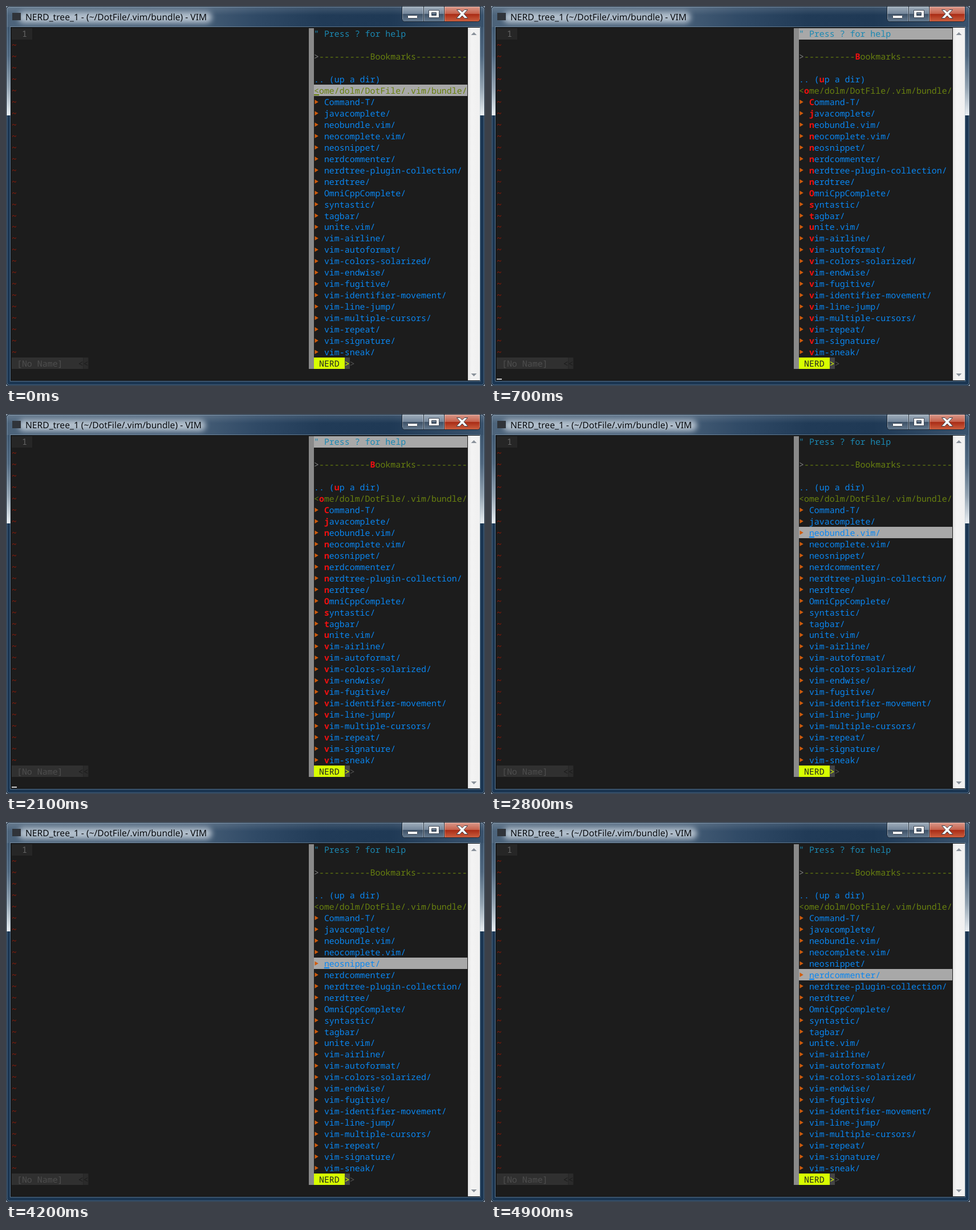
An HTML page that plays this animation: 840 by 667 pixels, repeating every 5.6 s.

```html
<!DOCTYPE html>
<html lang="en">
<head>
<meta charset="utf-8">
<title>File tree jump</title>
<style>
  html, body { margin: 0; width: 100%; height: 100%; overflow: hidden; background: #8d99a5; }
  svg { display: block; }
  text { white-space: pre; text-rendering: geometricPrecision; }
  .mono { font: 14.93px "Noto Sans Mono", "DejaVu Sans Mono", monospace; }
  .title { font: 15.62px "Noto Sans", "Open Sans", sans-serif; fill: #06090d; }
  .dir { fill: #0a86f0; }
  .help { fill: #1b88b2; }
  .olive { fill: #68800f; }
  .grey { fill: #808080; }
  .tilde { fill: #941a08; }
  .hint { fill: #f01010; font-weight: 700; }
</style>
</head>
<body>
<svg id="stage" width="840" height="667" viewBox="0 0 840 667">
  <defs>
    <linearGradient id="bar">
      <stop offset="0" stop-color="#4d647b"/><stop offset=".4" stop-color="#455d76"/>
      <stop offset=".52" stop-color="#304a66"/><stop offset=".66" stop-color="#213b57"/>
      <stop offset=".8" stop-color="#1f3955"/><stop offset="1" stop-color="#3a536d"/>
    </linearGradient>
    <linearGradient id="gloss" x2="0" y2="1">
      <stop offset="0" stop-color="#fff" stop-opacity=".16"/>
      <stop offset="1" stop-color="#fff" stop-opacity="0"/>
    </linearGradient>
    <linearGradient id="side" x2="0" y2="1">
      <stop offset="0" stop-color="#3c556e"/><stop offset=".35" stop-color="#506880"/>
      <stop offset=".7" stop-color="#94a4b2"/><stop offset="1" stop-color="#eaeff3"/>
    </linearGradient>
    <linearGradient id="glass" x2="0" y2="1">
      <stop offset="0" stop-color="#a3b1be"/><stop offset=".48" stop-color="#74869a"/>
      <stop offset=".5" stop-color="#3c5066"/><stop offset="1" stop-color="#667b90"/>
    </linearGradient>
    <linearGradient id="close" x2="0" y2="1">
      <stop offset="0" stop-color="#dc9c8e"/><stop offset=".48" stop-color="#c5624d"/>
      <stop offset=".5" stop-color="#a82a14"/><stop offset="1" stop-color="#cc6040"/>
    </linearGradient>
    <linearGradient id="track">
      <stop offset="0" stop-color="#e6e6e6"/><stop offset=".3" stop-color="#f3f3f3"/>
      <stop offset="1" stop-color="#f0f0f0"/>
    </linearGradient>
    <filter id="blur" x="-10%" y="-60%" width="120%" height="220%"><feGaussianBlur stdDeviation="5"/></filter>
    <clipPath id="frame"><rect width="840" height="667" rx="6"/></clipPath>
  </defs>

  <g clip-path="url(#frame)">
    <rect width="840" height="667" fill="#1c3753"/>
    <rect y="30" width="9" height="162" fill="url(#side)"/>
    <rect x="831" y="30" width="9" height="162" fill="url(#side)"/>
    <rect width="840" height="37" fill="url(#bar)"/>
    <rect width="840" height="16" fill="url(#gloss)"/>
    <rect id="glow" x="22" y="10" height="20" rx="9" fill="#d3dde6" opacity=".76" filter="url(#blur)"/>
  </g>
  <rect x=".5" y=".5" width="839" height="666" rx="6" fill="none" stroke="#0b1420"/>
  <rect x="1.5" y="1.5" width="837" height="664" rx="5" fill="none" stroke="#bdd0e0" stroke-opacity=".5"/>
  <rect x="7.5" y="36.5" width="824" height="622" fill="none" stroke="#a9bccb" stroke-opacity=".45"/>
  <rect x="8.5" y="37.5" width="822" height="620" fill="#1c1c1c" stroke="#0c1117"/>
  <rect x="11" y="12" width="15" height="13" fill="#30343a"/>
  <text id="title" class="title" x="34" y="25"></text>

  <g stroke="#1a2735">
    <path d="M694.5 .5H732.5V27.5H699.5Q694.5 27.5 694.5 22.5Z" fill="url(#glass)"/>
    <path d="M732.5 .5H768.5V27.5H732.5Z" fill="url(#glass)"/>
    <path d="M768.5 .5H831.5V22.5Q831.5 27.5 826.5 27.5H768.5Z" fill="url(#close)"/>
    <path d="M695.5 23V1.5H731.5V26.5M733.5 26.5V1.5H767.5V26.5M769.5 26.5V1.5H830.5V23" fill="none" stroke="#fff" stroke-opacity=".35"/>
  </g>
  <g stroke="#3b4350" fill="#fff">
    <rect x="704.5" y="16.5" width="17" height="5" rx="1"/>
    <path fill-rule="evenodd" d="M741.5 7.5H759.5V20.5H741.5ZM746.5 11.5V16.5H754.5V11.5Z"/>
    <path d="M790.5 6.5H796L800 10.5L804 6.5H809.5L803 13.7L810 21.5H804.2L800 17L795.8 21.5H790L797 13.7Z"/>
  </g>

  <rect x="810" y="38" width="21" height="619" fill="url(#track)"/>
  <path d="M815.5 51L820.5 46L825.5 51ZM815.5 645L820.5 650L825.5 645Z" fill="#8a929b"/>
  <rect x="531" y="39" width="9" height="598" fill="#8a8a8a"/>
  <g id="term" class="mono"></g>
</svg>

<script>
const NS = 'http://www.w3.org/2000/svg';
const CELL = 8.958, ROW = 19.95, TOP = 38.7, LEFT = 10, PANE = 540;
const STEP = 700;
const JUMP = -1;
// Selected row per step; JUMP shows the jump hints.
const steps = [5, JUMP, 15, JUMP, 8, 9, 10, 11];

const dirs = `Command-T javacomplete neobundle.vim neocomplete.vim neosnippet nerdcommenter
  nerdtree-plugin-collection nerdtree OmniCppComplete syntastic tagbar unite.vim vim-airline
  vim-autoformat vim-colors-solarized vim-endwise vim-fugitive vim-identifier-movement
  vim-line-jump vim-multiple-cursors vim-repeat vim-signature vim-sneak`.split(/\s+/);

const $ = id => document.getElementById(id);
const term = $('term');
const rowY = r => TOP + r * ROW;

function add(tag, attrs, parent = term) {
  const el = document.createElementNS(NS, tag);
  for (const k in attrs) el.setAttribute(k, attrs[k]);
  return parent.appendChild(el);
}

function box(x, row, cells, fill) {
  return add('rect', { x, y: Math.round(rowY(row)), width: Math.round(cells * CELL), height: 20, fill });
}

function put(str, x, row, attrs) {
  const el = add('text', { x, y: rowY(row) + 15.6, ...attrs });
  el.textContent = str;
  return el;
}

const cls = name => ({ class: name });
const ink = fill => ({ fill });

// Left window
box(LEFT, 0, 4, '#262626');
put('1', LEFT + 2 * CELL, 0, ink('#666'));
for (let r = 1; r < 29; r++) put('~', LEFT, r, cls('tilde'));
box(LEFT, 29, 14, '#303030');
box(LEFT + 14 * CELL, 29, 1, '#2b2b2b');
put('[No Name]', LEFT + CELL, 29, ink('#4e4e4e'));
put('<<', LEFT + 13 * CELL, 29, ink('#1c1c1c'));

// Tree window
const bar = add('rect', { x: PANE, width: 269, height: 20, fill: '#a8a8a8' });
const hints = [];

function line(str, row, name, col = 0, hintAt = -1) {
  const x = PANE + col * CELL;
  const el = put(str, x, row, cls(name));
  if (hintAt < 0) return;
  const plain = str.slice(0, hintAt) + ' ' + str.slice(hintAt + 1);
  const hint = put(str[hintAt], x + hintAt * CELL, row, cls('hint'));
  hints.push({ el, hint, str, plain });
}

const dashes = '-'.repeat(10);
line('" Press ? for help', 0, 'help');
line('>', 2, 'grey');
line(dashes + 'Bookmarks' + dashes, 2, 'olive', 1, 10);
line('.. (up a dir)', 4, 'dir', 0, 4);
line('<ome/dolm/DotFile/.vim/bundle/', 5, 'olive', 0, 1);
dirs.forEach((name, i) => {
  const y = rowY(i + 6) + 10;
  add('path', { d: `M541.5 ${y - 3.8}L547.8 ${y}L541.5 ${y + 3.8}Z`, fill: '#cf5b0c' });
  line(name + '/', i + 6, 'dir', 2, 0);
});

box(PANE, 29, 6, '#d7ff00');
box(594, 29, 1, '#444');
put('NERD', PANE + CELL, 29, ink('#222'));
put('>', PANE + 6 * CELL, 29, ink('#d7ff00'));
put('>', PANE + 7 * CELL, 29, ink('#555'));

const cursor = add('rect', { width: 9, height: 2 });

function show(sel) {
  const jump = sel === JUMP;
  const row = jump ? 0 : sel;
  bar.setAttribute('y', Math.round(rowY(row)));
  for (const h of hints) {
    h.el.textContent = jump ? h.plain : h.str;
    h.hint.style.display = jump ? '' : 'none';
  }
  const x = jump ? LEFT : PANE + (sel > 5 ? 2 * CELL : 0);
  const y = jump ? 654 : Math.round(rowY(sel)) + 17;
  const fill = jump ? '#d0d0d0' : sel > 5 ? '#0a86f0' : '#68800f';
  for (const [k, v] of Object.entries({ x, y, fill })) cursor.setAttribute(k, v);
  $('title').textContent = `NERD_tree_1 ${jump ? '' : '- '}(~/DotFile/.vim/bundle) - VIM`;
  $('glow').setAttribute('width', jump ? 328 : 339);
}

let last = -1;
const start = performance.now();
function tick(now) {
  const i = Math.floor(Math.max(0, now - start) / STEP) % steps.length;
  if (i !== last) show(steps[last = i]);
  requestAnimationFrame(tick);
}
tick(start);
</script>
</body>
</html>
```
